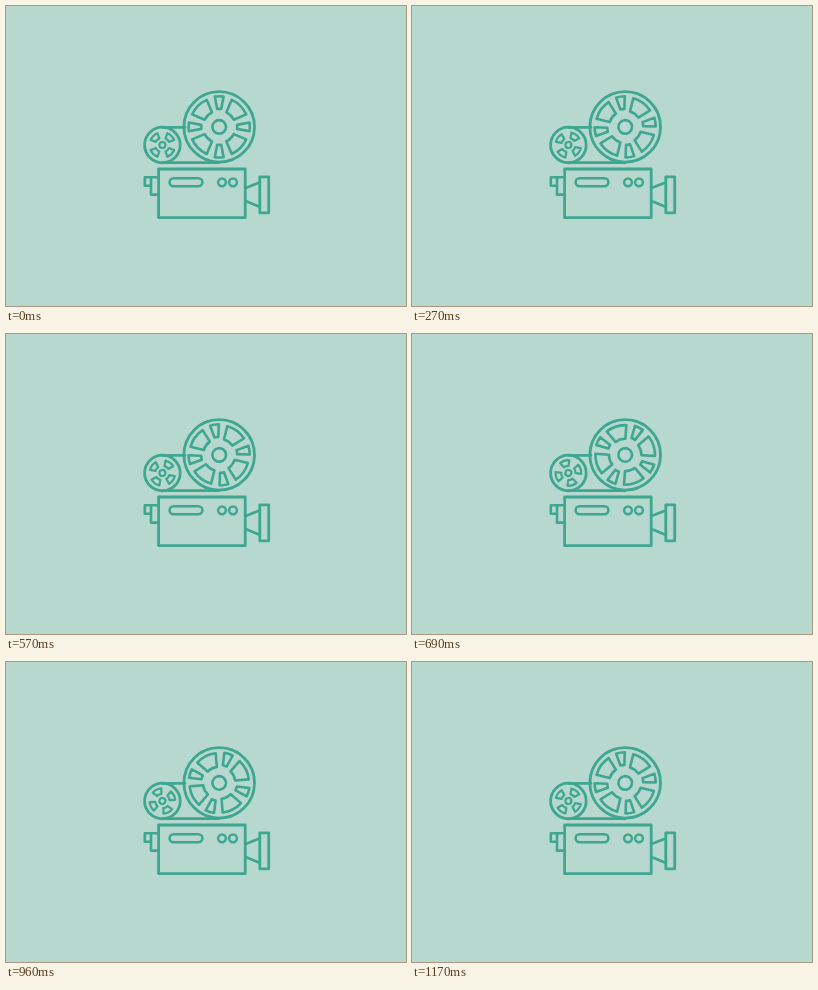
Recreate the animation shown at these times as an HTML page. Size 400 by 300 pixels, loop 1.2 s.

```html
<!DOCTYPE html>
<html lang="en">
<head>
<meta charset="utf-8">
<title>Film projector</title>
<style>
  html, body { margin: 0; width: 100%; height: 100%; overflow: hidden; background: #b7d8cf; }
  svg { display: block; width: 100vw; height: 100vh; }
</style>
</head>
<body>
<svg viewBox="0 0 400 300" fill="none" stroke="#3fa68f" stroke-width="2.8" stroke-linejoin="round" stroke-linecap="round">
  <path d="M156.5 121.3H179M156.5 156.7H213"/>
  <circle cx="213.2" cy="120.9" r="35.3"/>
  <circle cx="156.4" cy="139" r="17.8"/>
  <g id="big" stroke-width="2.6"><circle r="6.8"/></g>
  <g id="small" stroke-width="2.2"><circle r="3"/></g>
  <rect x="152.6" y="163" width="86.6" height="48.7"/>
  <rect x="163.6" y="172.3" width="32.8" height="8" rx="4" stroke-width="2.6"/>
  <circle cx="216" cy="176.3" r="3.9" stroke-width="2.5"/>
  <circle cx="227" cy="176.3" r="3.9" stroke-width="2.5"/>
  <path d="M145 171.2H138.8V179.8H145M152 171.2H145V188.6H152" stroke-width="2.6"/>
  <path d="M239.5 182L253.5 176.5M239.5 195L253.5 200.8"/>
  <rect x="253.8" y="170.8" width="8.9" height="36"/>
</svg>
<script>
const LOOP = 1200, STEP = 30;
const big = document.getElementById('big');
const small = document.getElementById('small');

// Four tapered windows: inner/outer radius and half widths, first one at the given angle
function addWindows(reel, angle, r1, w1, r2, w2) {
  const y1 = Math.sqrt(r1 * r1 - w1 * w1), y2 = Math.sqrt(r2 * r2 - w2 * w2);
  const d = `M${-w1} ${-y1}L${-w2} ${-y2}A${r2} ${r2} 0 0 1 ${w2} ${-y2}L${w1} ${-y1}A${r1} ${r1} 0 0 0 ${-w1} ${-y1}Z`;
  for (let i = 0; i < 4; i++) {
    const p = document.createElementNS('http://www.w3.org/2000/svg', 'path');
    p.setAttribute('d', d);
    p.setAttribute('transform', `rotate(${angle + i * 90})`);
    reel.append(p);
  }
}

addWindows(big, 0, 18, 2, 30.6, 4.4);
addWindows(big, 45, 16.2, 5.2, 29.8, 10.3);
addWindows(small, 45, 7.2, 2.4, 12.8, 4.8);

function draw(ms) {
  const turn = Math.floor((ms % LOOP) / STEP) * STEP / LOOP * 360;
  big.setAttribute('transform', `translate(213.2 120.9) rotate(${turn})`);
  small.setAttribute('transform', `translate(156.4 139) rotate(${turn})`);
}

let start;
function tick(now) {
  start ??= now;
  draw(Math.max(0, now - start));
  requestAnimationFrame(tick);
}
draw(0);
requestAnimationFrame(tick);
</script>
</body>
</html>
```
